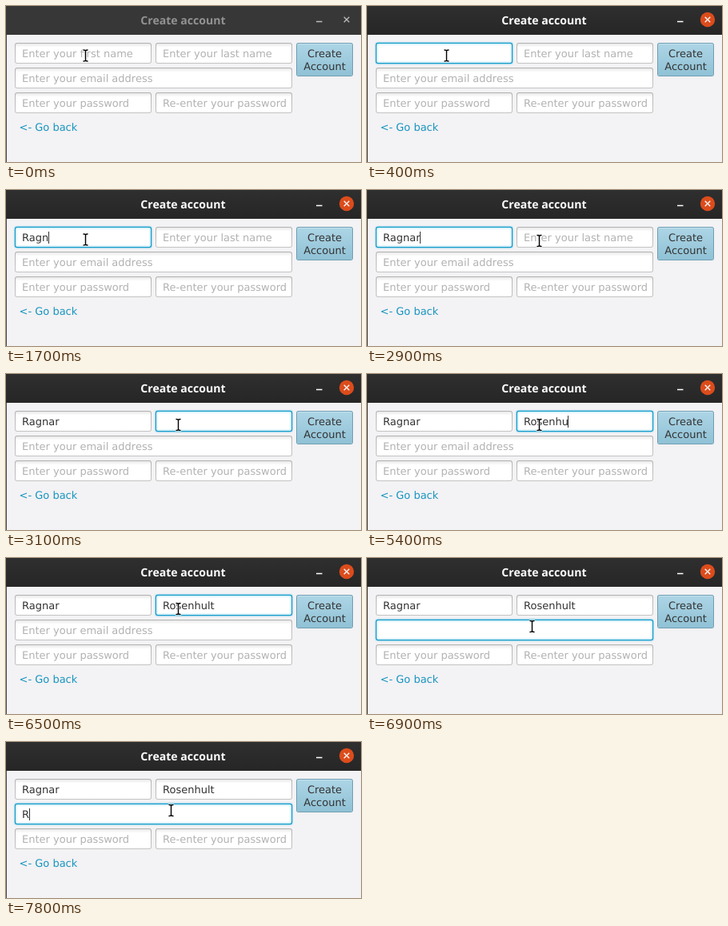
An HTML page for the animation above (8 s loop, 444x195 px).

```html
<!DOCTYPE html>
<html lang="en">
<head>
<meta charset="utf-8">
<title>Create account</title>
<style>
  html, body { margin: 0; width: 444px; height: 195px; overflow: hidden; background: #f3f2f4; }
  svg { display: block; }
  text { font: 13px "DejaVu Sans", sans-serif; fill: #333; text-rendering: geometricPrecision; }
  #title { font: bold 14.1px "Open Sans", "Noto Sans", sans-serif; }
  .mid { text-anchor: middle; }
  .prompt { fill: #b2b2b2; }
</style>
</head>
<body>
<svg width="444" height="195" viewBox="0 0 444 195">
  <defs>
    <linearGradient id="bar" x2="0" y2="1"><stop stop-color="#2f2f2f"/><stop offset="1" stop-color="#262626"/></linearGradient>
    <linearGradient id="edge" x2="0" y2="1"><stop stop-color="#b2b2b2"/><stop offset="1" stop-color="#c4c4c4"/></linearGradient>
    <linearGradient id="inset" x2="0" y2="1"><stop stop-color="#e9e9e9"/><stop offset=".2" stop-color="#fff"/></linearGradient>
    <linearGradient id="blue" x2="0" y2="1"><stop stop-color="#acd5e5"/><stop offset="1" stop-color="#90c1d5"/></linearGradient>
    <clipPath id="clip"><rect x="12" y="40" width="338.5" height="100"/></clipPath>
    <path id="beam" d="M-2.5-7Q0-7 0-5.5Q0-7 2.5-7M0-5.5V5.5M-2.5 7Q0 7 0 5.5Q0 7 2.5 7"/>
  </defs>
  <rect width="1" height="195" fill="#4a4a4a"/>
  <rect id="head" width="444" height="36"/>
  <text id="title" class="mid" x="221.5" y="23">Create account</text>
  <circle id="close" cx="426" cy="17" r="9.2" fill="#dc4c1c"/>
  <path id="icons" d="M388 19.5h7.5M422.7 13.7l6.6 6.6m0-6.6l-6.6 6.6" fill="none" stroke-width="1.3"/>

  <rect x="363" y="46" width="71" height="42" rx="3" fill="#6f9fb2"/>
  <rect x="364" y="47" width="69" height="40" rx="2" fill="#c3e2ee"/>
  <rect x="364" y="48" width="69" height="39" rx="2" fill="url(#blue)"/>
  <text class="mid" x="398.5" y="64">Create</text>
  <text class="mid" x="398.5" y="80">Account</text>
  <text x="16.5" y="156" style="fill:#1694c1">&lt;- Go back</text>

  <g id="form"></g>
  <rect id="caret" width="1" height="15" fill="#333"/>
  <g id="pointer" fill="none" stroke-linecap="round">
    <use href="#beam" stroke="#fff" stroke-width="3" stroke-opacity=".8"/>
    <use href="#beam" stroke="#000" stroke-width="1.4"/>
  </g>
</svg>
<script>
const LOOP = 8000, TICK = 100, BLINK = 500;
const $ = id => document.getElementById(id);

function add(parent, tag, attrs) {
  const el = document.createElementNS('http://www.w3.org/2000/svg', tag);
  for (const k in attrs) el.setAttribute(k, attrs[k]);
  return parent.appendChild(el);
}

// One text box on the form grid: plain look, focus ring and clipped text.
function makeField(prompt, col, row, span = 1) {
  const x = 11 + 176 * col, y = 46 + 31 * row, w = 176 * span - 5;
  const plain = add($('form'), 'g'), ring = add($('form'), 'g');
  const layer = (parent, inset, rx, fill) => add(parent, 'rect', {
    x: x + inset, y: y + inset, width: w - 2 * inset, height: 26 - 2 * inset, rx, fill });
  layer(plain, 0, 3, 'url(#edge)');
  layer(plain, 1, 2, 'url(#inset)');
  layer(ring, -0.2, 3, '#139cca');
  layer(ring, 1, 2, '#fff');
  layer(ring, -1.4, 4, '#039ed322');
  layer(ring, 3, 0, '#fff');
  const clip = add($('form'), 'g', { 'clip-path': 'url(#clip)' });
  const label = add(clip, 'text', { x: x + 9, y: y + 18 });
  return { x, y, prompt, plain, ring, label };
}

const fields = [
  makeField('Enter your first name', 0, 0),
  makeField('Enter your last name', 1, 0),
  makeField('Enter your email address', 0, 1, 2),
  makeField('Enter your password', 0, 2),
  makeField('Re-enter your password', 1, 2),
];

// Each click moves the focus to the next field.
const clicks = [400, 3000, 6900];

// Bursts of typing: keep some letters, then add text, each key coming faster.
const bursts = [
  { field: 0, keep: 0, text: 'Ragnar', start: 1100, end: 1900 },
  { field: 1, keep: 0, text: 'Rosen', start: 3800, end: 4300 },
  { field: 1, keep: 5, text: 'ho', start: 4500, end: 4700 },
  { field: 1, keep: 6, text: '', start: 5200, end: 5200 },
  { field: 1, keep: 6, text: 'ult', start: 5400, end: 6000 },
  { field: 2, keep: 0, text: 'R', start: 7700, end: 7700 },
];

function keyTimes({ text, start, end }) {
  const last = text.length - 1;
  if (last < 1) return [start];
  return [...text].map((_, i) => start + (end - start) * (1 - (1 - i / last) ** 1.5));
}
for (const b of bursts) b.keys = keyTimes(b);

function typeAll(t) {
  const values = fields.map(() => '');
  let lastKey = 0;
  for (const { field, keep, text, start, keys } of bursts) {
    if (t < start) break;
    const pressed = keys.filter(k => k <= t);
    values[field] = values[field].slice(0, keep) + text.slice(0, pressed.length);
    lastKey = Math.ceil(pressed.at(-1) / TICK) * TICK;
  }
  return { values, lastKey };
}

function glide(t, start, end) {
  const u = Math.min(1, Math.max(0, (t - start) / (end - start)));
  return u * u * (3 - 2 * u);
}

const show = (el, on) => el.setAttribute('visibility', on ? 'visible' : 'hidden');

function draw(t) {
  const current = clicks.filter(c => c <= t).length - 1, active = current >= 0;
  const { values, lastKey } = typeAll(t);
  $('head').setAttribute('fill', active ? 'url(#bar)' : '#373737');
  $('title').style.fill = active ? '#fff' : '#929292';
  $('icons').setAttribute('stroke', active ? '#fff' : '#bcbcbc');
  show($('close'), active);

  fields.forEach((f, i) => {
    const focused = i === current;
    show(f.plain, !focused);
    show(f.ring, focused);
    f.label.textContent = values[i] || (focused ? '' : f.prompt);
    f.label.setAttribute('class', values[i] ? '' : 'prompt');
  });

  // The caret blinks anew after every key and shortly after a click.
  const awake = Math.max(lastKey, clicks[current] + 200);
  show($('caret'), active && Math.floor((t - awake) / BLINK) % 2 === 0);
  if (active) {
    const f = fields[current];
    $('caret').setAttribute('x', Math.floor(f.x + 9 + f.label.getComputedTextLength()));
    $('caret').setAttribute('y', f.y + 6);
  }

  const across = glide(t, 2400, 2900), down = glide(t, 6500, 6800);
  const x = 99.5 + 116 * across - 9 * down, y = 62 + 1.5 * across + 22 * down;
  $('pointer').setAttribute('transform', `translate(${x} ${y})`);
}

const begin = performance.now();
function tick() {
  const t = (performance.now() - begin) % LOOP;
  draw(Math.floor(t / TICK) * TICK);
  requestAnimationFrame(tick);
}
tick();
</script>
</body>
</html>
```
